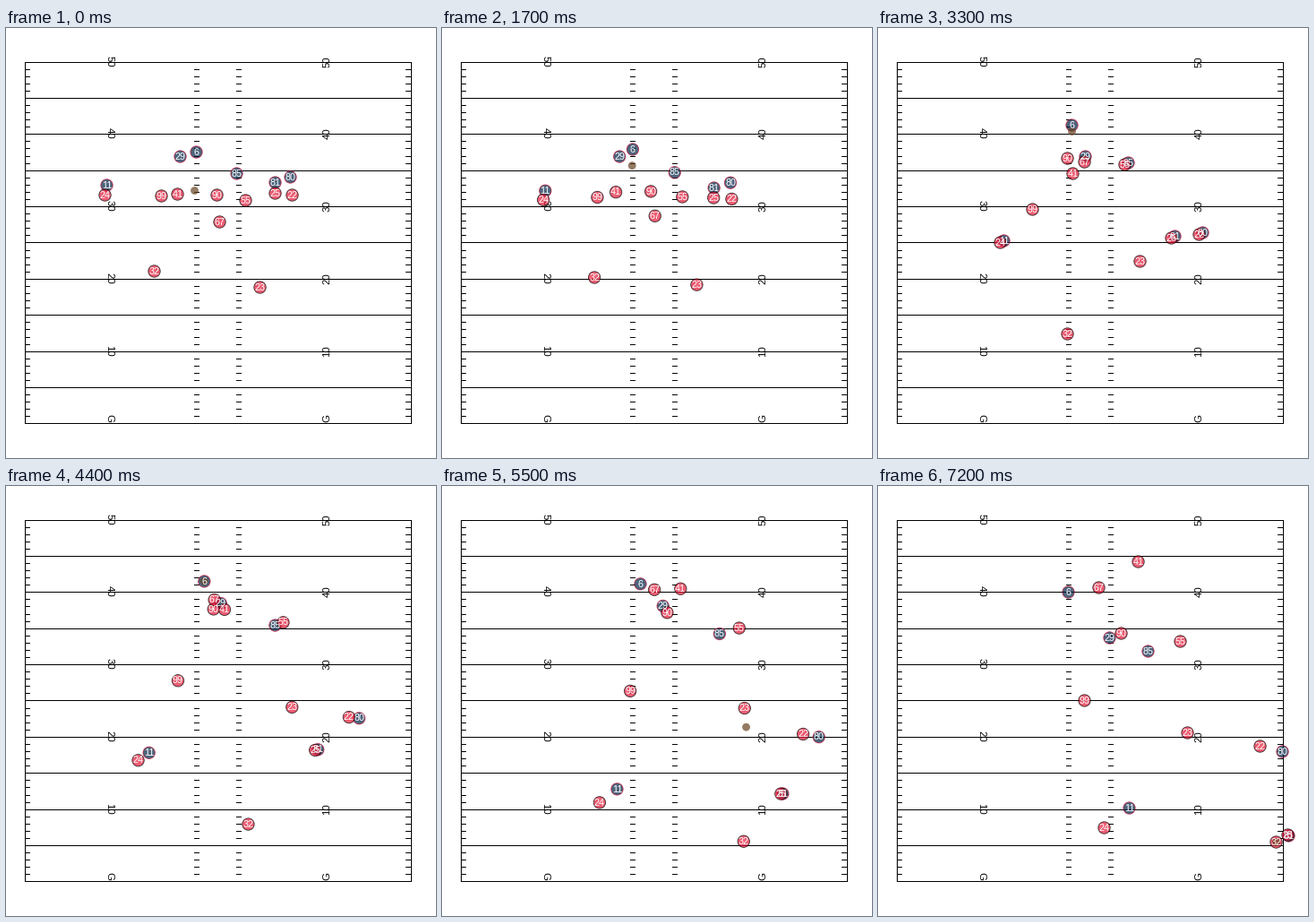
Animation, 480 px wide and 480 px high, one loop 7300 ms. Source, as a matplotlib script:

```python
import numpy as np
import matplotlib.pyplot as plt
from matplotlib.animation import FuncAnimation
from matplotlib.patches import Circle

SIZE, DPI = 480, 72          # at 72 dpi one point is one pixel
FRAMES, STEP = 73, 100
LEFT, RIGHT = 21, 452
HASHES = (LEFT, 210, 257, 446)

NAVY, RED, CRIMSON, BROWN = "#002244", "#e31837", "#c60c30", "#654321"
plt.rcParams["font.family"] = "Liberation Sans"

# Line-up, snap, end of drop back, throw in the air, end of play (seconds)
TIMES = np.array([0, 1.7, 3.3, 4.9, 7.2])
EARLY = 0.1                  # share of the first run done by the snap

# Routes: line-up, then the spots at 3.3, 4.9 and 7.2 seconds
OFFENSE = {
    "6": [(212, 138), (216, 108), (222, 107), (212, 118)],
    "29": [(194, 143), (231, 143), (242, 128), (258, 169)],
    "85": [(257, 162), (279, 150), (307, 159), (301, 184)],
    "11": [(112, 175), (140, 237), (172, 321), (280, 359)],
    "80": [(317, 166), (362, 228), (407, 270), (451, 296)],
    "81": [(300, 172), (331, 232), (359, 320), (458, 390)],
}
ZONE = {
    "99": [(173, 187), (172, 202), (201, 223), (230, 239)],
    "41": [(191, 185), (217, 162), (255, 126), (290, 84)],
    "90": [(235, 186), (211, 145), (242, 137), (271, 164)],
    "67": [(238, 216), (230, 149), (234, 120), (246, 113)],
    "23": [(283, 289), (292, 260), (330, 244), (345, 275)],
    "32": [(165, 271), (211, 341), (300, 389), (444, 397)],
}
# Man coverage: receiver, cushion at the line-up, cushion at the end
COVERAGE = {
    "24": ("11", (-2, 11), (-28, 22)),
    "55": ("85", (10, 30), (36, -11)),
    "25": ("81", (0, 12), (-1, -1)),
    "22": ("80", (2, 20), (-25, -6)),
}
TIGHT = np.array([-4, 2])    # cushion when a defender is closest

SNAP, IN_HAND, RELEASE, CATCH, END = 1.2, 1.9, 4.4, 6.3, 7.2
BALL_SPOT, CATCH_SPOT = np.array([210, 181]), np.array([425, 387])


def route(points):
    """Add the slow start before the first running spot."""
    p = np.array(points, float)
    return np.insert(p, 1, p[0] + EARLY * (p[1] - p[0]), axis=0)


def shadow(receiver, first, last):
    """Follow a receiver: close in, then drift to the last cushion."""
    last = np.array(last)
    mid = TIGHT + 0.5 * (last - TIGHT)
    return route(np.array(OFFENSE[receiver]) + [first, TIGHT, mid, last])


def spline(p, t):
    """Cubic Hermite curve through the waypoints."""
    slope = np.gradient(p, TIMES, axis=0)
    i = min(np.searchsorted(TIMES, t, side="right") - 1, len(TIMES) - 2)
    h = TIMES[i + 1] - TIMES[i]
    u = (t - TIMES[i]) / h
    return ((2 * u**3 - 3 * u**2 + 1) * p[i] + (u**3 - 2 * u**2 + u) * h * slope[i]
            + (3 * u**2 - 2 * u**3) * p[i + 1] + (u**3 - u**2) * h * slope[i + 1])


def blend(a, b, t, start, stop):
    return a + (b - a) * np.clip((t - start) / (stop - start), 0, 1)


def ball_at(t):
    passer, catcher = OFFENSE["6"], ZONE["32"]
    hands = spline(route(passer), min(t, RELEASE))
    hands = hands + [0, blend(7, 0, t, 3.3, RELEASE)]
    if t < RELEASE:
        return blend(BALL_SPOT, hands, t, SNAP, IN_HAND)
    if t < CATCH:
        return blend(hands, CATCH_SPOT, t, RELEASE, CATCH)
    return blend(CATCH_SPOT, np.array(catcher[-1]), t, CATCH, END)


def yard_y(yard):
    return int(441.96 - 8.079 * yard)


fig = plt.figure(figsize=(SIZE / DPI, SIZE / DPI), dpi=DPI, facecolor="white")
ax = fig.add_axes([0, 0, 1, 1])
ax.set_xlim(-0.5, SIZE - 0.5)
ax.set_ylim(SIZE - 0.5, -0.5)
ax.axis("off")


def draw_field():
    style = dict(colors="black", lw=1, snap=False)
    lines = [yard_y(k) for k in range(0, 51, 5)]
    ticks = [yard_y(k) for k in range(50) if k % 5]
    ax.hlines(lines, LEFT - 0.5, RIGHT + 0.5, **style)
    ax.vlines([LEFT, RIGHT], lines[-1] - 0.5, lines[0] + 0.5, **style)
    for x in HASHES:
        ax.hlines(ticks, x - 0.5, x + 5.5, **style)
    for yard in range(0, 51, 10):
        label = str(yard) if yard else "G"
        y = yard_y(yard) - (1 if yard else 6)
        for x, angle in ((112, 270), (361, 90)):
            ax.text(x, y, label, size=11.4, rotation=angle, rotation_mode="anchor",
                    ha="center", va="baseline")


def add_dot(radius, face, edge, z):
    dot = Circle((0, 0), radius, fc=face, ec=edge, lw=0.9, alpha=0.7, zorder=z)
    return ax.add_patch(dot)


def add_player(number, track, face, edge, z):
    label = ax.text(0, 0, number, size=10.8, color="white", ha="center",
                    va="baseline", zorder=9)
    return track, add_dot(6.7, face, edge, z), label


draw_field()
players = [add_player(n, route(p), NAVY, CRIMSON, 5) for n, p in OFFENSE.items()]
players += [add_player(n, route(p), RED, "black", 6) for n, p in ZONE.items()]
players += [add_player(n, shadow(*c), RED, "black", 6) for n, c in COVERAGE.items()]
ball = add_dot(4.4, BROWN, "none", 7)


def update(frame):
    t = frame * STEP / 1000
    for track, dot, label in players:
        x, y = spline(track, t)
        dot.center = x, y
        label.set_position((x, y + 3.2))
    ball.center = ball_at(t)
    return []


anim = FuncAnimation(fig, update, frames=FRAMES, interval=STEP, repeat=True,
                     repeat_delay=0, init_func=lambda: update(0))
plt.show()
```
